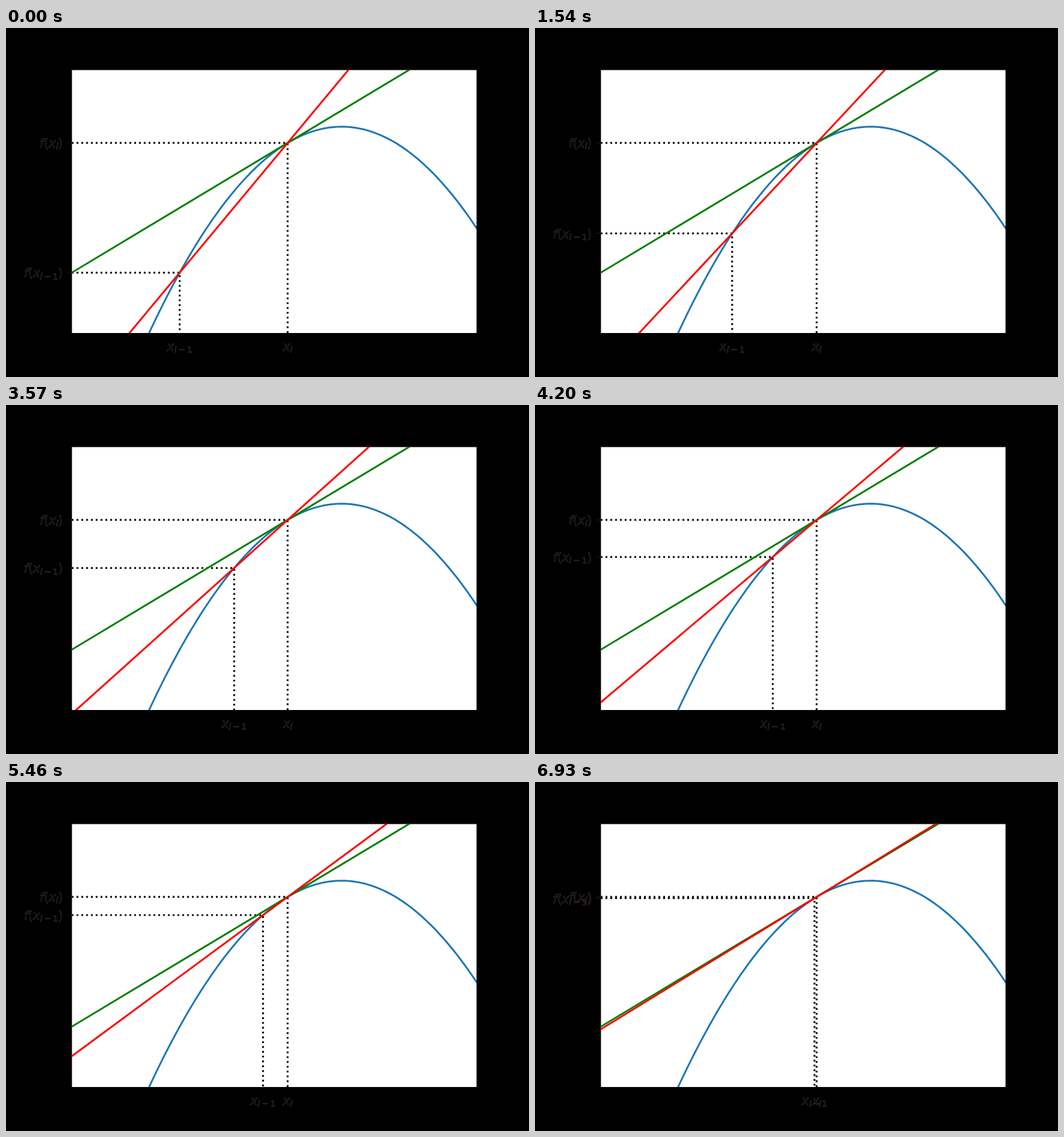
An HTML page for the animation above (7000 ms loop, 917x611 px).

```html
<!DOCTYPE html>
<html lang="en">
<head>
<meta charset="utf-8">
<title>Secant approaching tangent</title>
<style>
  html, body { margin: 0; width: 100%; height: 100%; overflow: hidden; background: #000; }
  svg { display: block; }
  .plot path { fill: none; stroke-width: 3.18; }
  .plot .dots { stroke: #000; stroke-dasharray: 3.18 5.25; }
  .rim { fill: none; stroke: #2c1619; stroke-width: 1; }
  text {
    font: 21.2px "DejaVu Sans", sans-serif;
    fill: #000; stroke: #352a2b; stroke-width: .8;
  }
  .it { font-style: italic; }
  .sub { font-size: 14.85px; }
  .mid { text-anchor: middle; }
  .end { text-anchor: end; }
</style>
</head>
<body>
<svg width="917" height="611" viewBox="0 0 917 611">
  <defs>
    <clipPath id="axes"><rect x="115.5" y="73.5" width="709.5" height="460.5"/></clipPath>
  </defs>
  <rect width="917" height="611"/>
  <rect x="115.5" y="73.5" width="709.5" height="460.5" fill="#fff"/>
  <path class="rim" d="M115 534V73H825"/>
  <g class="plot" clip-path="url(#axes)">
    <path id="curve" stroke="#1f77b4"/>
    <path id="guideA" class="dots"/>
    <path id="guideB" class="dots"/>
    <path id="tangent" stroke="#008000"/>
    <path id="secant" stroke="#f00"/>
  </g>
  <g id="labels"></g>
</svg>
<script>
  const LEFT = 115.2, RIGHT = 826, BOTTOM = 534.6;
  const UNIT = 189.3, XI = LEFT + 2 * UNIT;
  const PEAK = { x: LEFT + 2.5 * UNIT, y: 172.8 };
  const BEND = 28.4 / (UNIT / 2) ** 2;
  const STEPS = 100, STEP_MS = 70;

  const $ = id => document.getElementById(id);
  const draw = (id, d) => $(id).setAttribute('d', d);
  const f = x => PEAK.y + BEND * (x - PEAK.x) ** 2;
  const slope = (a, b) => BEND * (a + b - 2 * PEAK.x);

  // Straight line through the fixed point, across the whole plot
  function line(id, m) {
    const y = x => f(XI) + m * (x - XI);
    draw(id, `M${LEFT - 5} ${y(LEFT - 5)}L${RIGHT} ${y(RIGHT)}`);
  }

  const guide = (id, x) => draw(id, `M${LEFT} ${f(x)}H${x}V${BOTTOM}`);

  const subI = '<tspan class="it sub" dy="3.2">i</tspan>';
  const prev = subI + '<tspan class="sub" dx="2.9">−</tspan><tspan class="sub" dx="2.9">1</tspan>';
  const name = sub => `<tspan class="it">x</tspan>${sub}`;
  const call = sub => `<tspan class="it">f</tspan>(${name(sub)}<tspan dy="-3.2">)</tspan>`;

  // Tick labels; those of the fixed point lie on top
  function label(id, sub) {
    return `<g id="x${id}"><text class="mid" y="565">${name(sub)}</text></g>
      <g id="y${id}"><path class="rim" d="M107 0H114"/>
      <text class="end" x="99.8" y="8">${call(sub)}</text></g>`;
  }

  function place(id, x) {
    $('x' + id).setAttribute('transform', `translate(${x} 0)`);
    $('y' + id).setAttribute('transform', `translate(0 ${f(x)})`);
  }

  function setup() {
    let d = '';
    for (let x = LEFT; x <= RIGHT + 5; x += 5) d += `${d ? 'L' : 'M'}${x} ${f(x)}`;
    draw('curve', d);
    line('tangent', slope(XI, XI));
    guide('guideA', XI);
    $('labels').innerHTML = label('Prev', prev) + label('Cur', subI);
    place('Cur', XI);
  }

  function render() {
    const step = Math.floor(performance.now() / STEP_MS) % STEPS;
    const x = LEFT + UNIT * (1 + 0.98 * step / (STEPS - 1));
    line('secant', slope(x, XI));
    guide('guideB', x);
    place('Prev', x);
    requestAnimationFrame(render);
  }

  setup();
  render();
</script>
</body>
</html>
```
